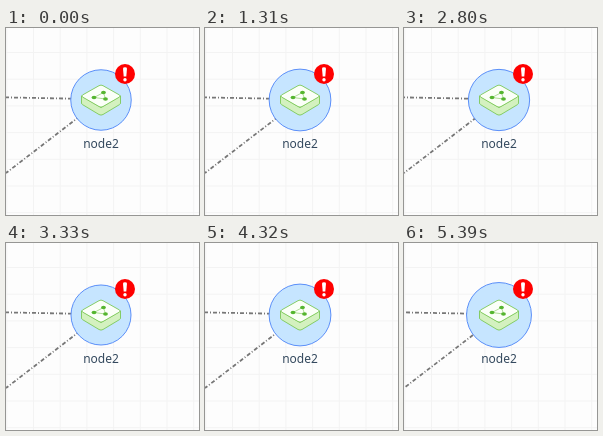
Recreate the animation shown at these times as an HTML page. Size 193x187 px, loop 5490 ms.

```html
<!DOCTYPE html>
<html lang="en">
<head>
<meta charset="utf-8">
<title>Pulsing node</title>
<style>
  html, body { margin: 0; width: 100%; height: 100%; overflow: hidden; background: #fdfdfd; }
  svg { display: block; width: 193px; height: 187px; }
  .edge { stroke: #777; stroke-width: 1.8; stroke-dasharray: 4 2 1 2; }
  .label { font: 12px "Noto Sans", "Open Sans", sans-serif; fill: #34495e; text-anchor: middle; }
  .box { stroke: #7cc957; stroke-width: .9; stroke-linejoin: round; }
  .links { fill: none; stroke: #a5da8b; stroke-width: .9; }
  .dots { fill: #55b52f; }
</style>
</head>
<body>
<svg viewBox="0 0 193 187">
  <defs>
    <pattern id="grid" x="27" y="24" width="26.7" height="26.7" patternUnits="userSpaceOnUse">
      <path d="M0 .5H27M.5 0V27" stroke="#f3f3f3"/>
    </pattern>
  </defs>
  <rect width="193" height="187" fill="url(#grid)"/>

  <line class="edge" x1="0" y1="69.4" x2="95" y2="71.2"/>
  <line class="edge" x1="0" y1="145" x2="95" y2="72"/>

  <circle id="node" cx="95" cy="72" r="30" fill="#c6e5ff" stroke="#5b8ff9"/>

  <g class="box">
    <path d="M75.5 68V75Q75.500 76 76.500 76.600L93 86.500Q95 87.700 97 86.500L113.500 76.600Q114.500 76 114.500 75V68L95 79.500Z" fill="#d3f1bf"/>
    <path d="M93 57.700Q95 56.500 97 57.700L113.500 67Q115 68 113.500 69L97 78.500Q95 79.700 93 78.500L76.500 69Q75 68 76.500 67Z" fill="#fbfff8"/>
  </g>
  <path class="links" d="M97.500 64.500L88 69.500L99.500 71Z"/>
  <g class="dots">
    <ellipse cx="97.500" cy="64.500" rx="2.400" ry="1.800"/>
    <ellipse cx="88" cy="69.500" rx="2.400" ry="1.800"/>
    <ellipse cx="99.500" cy="71" rx="2.400" ry="1.800"/>
  </g>

  <circle cx="119" cy="46" r="10" fill="#f00"/>
  <path d="M117 40.500Q117 39.300 119 39.300T121 40.500L120.300 48.500H117.700Z" fill="#fff"/>
  <circle cx="119" cy="51.700" r="1.700" fill="#fff"/>

  <text class="label" x="95" y="120">node2</text>
</svg>
<script>
  const LOOP = 5490, PULSE = 3000, PEAK = 2015, TICK = 1000 / 60;

  // How long each picture is held, in hundredths of a second.
  const holds = [14, 13, 14, 12, 12, 12, 15, 12, 15, 12, 12, 15, 13, 15,
    12, 15, 15, 13, 15, 12, 12, 14, 13, 12, 14, 12, 12, 27,
    12, 12, 12, 12, 12, 12, 15, 15, 15, 14, 12, 12, 10];

  const node = document.getElementById("node");
  const edges = document.querySelectorAll(".edge");
  const mod = (a, n) => ((a % n) + n) % n;

  function heldTime(t) {
    let start = 0;
    for (const hold of holds) {
      if (t < start + hold * 10) break;
      start += hold * 10;
    }
    return start;
  }

  function draw(now) {
    const t = heldTime(now % LOOP);

    // Cubic rise and fall around each peak.
    const phase = mod(t - PEAK + PULSE / 2, PULSE) - PULSE / 2;
    const swell = (1 - Math.abs(phase) / (PULSE / 2)) ** 3;
    node.setAttribute("r", 30 + 5.8 * swell);

    // Dashes advance one pixel per tick and restart after ten ticks.
    const shift = mod(Math.floor((t - 18.7) / TICK), 10);
    edges.forEach(edge => edge.style.strokeDashoffset = -shift);
    requestAnimationFrame(draw);
  }

  draw(performance.now());
</script>
</body>
</html>
```
